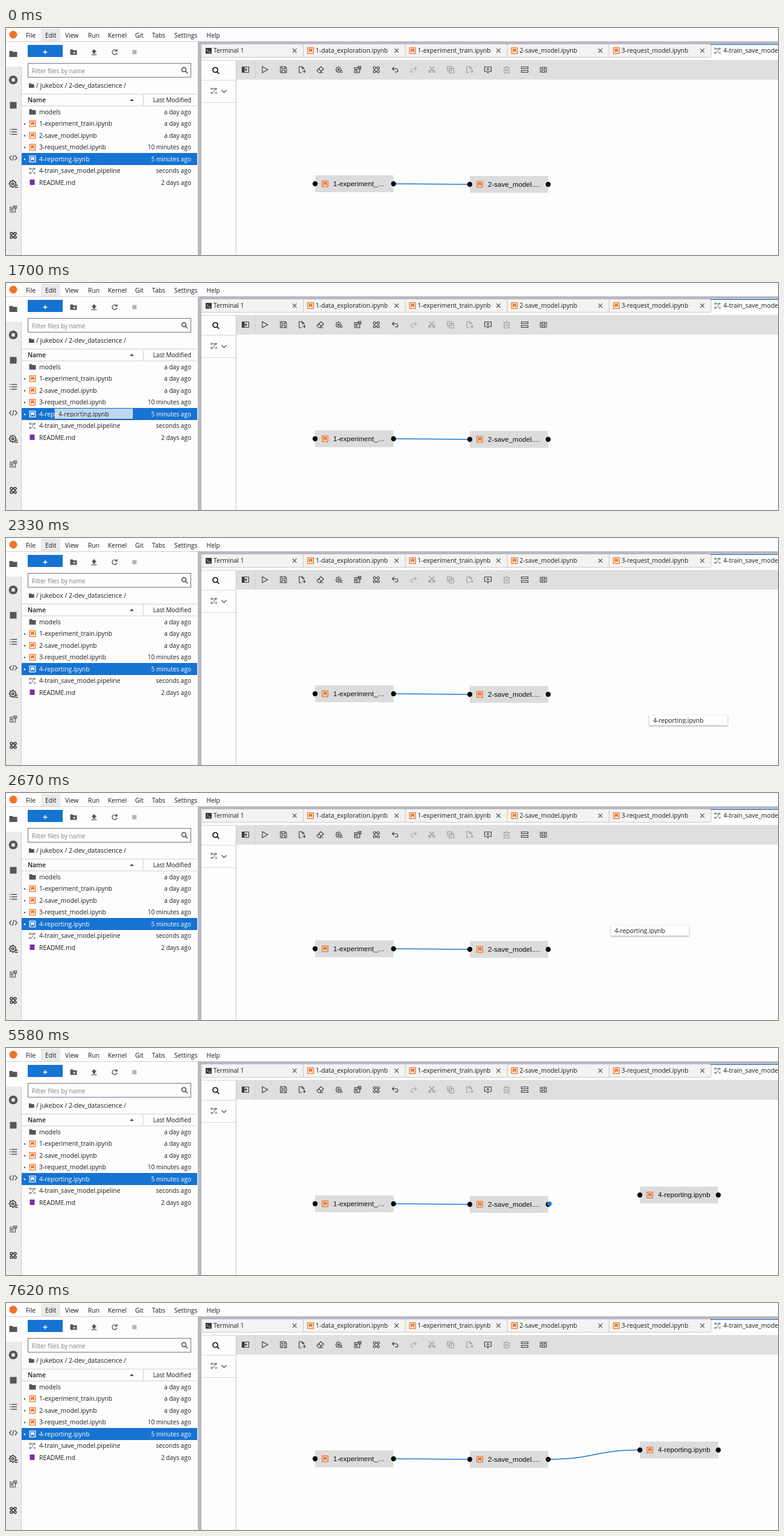
An HTML page that plays this animation: 1280 px wide and 376 px high, repeating every 8970 ms.

```html
<!DOCTYPE html>
<html lang="en">
<head>
<meta charset="utf-8">
<title>Pipeline editor</title>
<style>
html, body { margin: 0; width: 100%; height: 100%; overflow: hidden; background: #fdfdfd; }
svg { display: block; }
text { font: 10.35px "Open Sans", "Noto Sans", sans-serif; fill: #1c1c1c; white-space: pre; }
.node, .tip text { font: 11.55px "Liberation Sans", Arial, sans-serif; fill: #0c0c0c; }
.tip text { font-size: 11.4px; }
.card { opacity: .72; }
.card rect { filter: drop-shadow(0 1px 1.2px rgba(0, 0, 50, .6)); }
</style>
</head>
<body>
<svg id="stage" width="1280" height="376" viewBox="0 0 1280 376"></svg>
<script>
const LOOP = 8970, BLUE = '#1673d1', LINK = '#1f7bcd', ORANGE = '#ee7428', GREY = '#565656', PALE = '#a9a9a9';

const rect = (x, y, w, h, fill, more = '') => `<rect x="${x}" y="${y}" width="${w}" height="${h}" fill="${fill}" ${more}/>`;
const dot = (x, y, r, fill = '#0a0a0a', more = '') => `<circle cx="${x}" cy="${y}" r="${r}" fill="${fill}" ${more}/>`;
const text = (x, y, s, more = '') => `<text x="${x}" y="${y}" ${more}>${s}</text>`;
const icon = (x, y, d, color = GREY, width = 1.2, fill = 'none') =>
  `<path transform="translate(${x} ${y})" d="${d}" stroke="${color}" stroke-width="${width}" fill="${fill}"/>`;
const solid = (x, y, d, color = GREY) => icon(x, y, d, 'none', 0, color);
const ring = (x, y, r) => `M${x - r} ${y}a${r} ${r} 0 1 0 ${2 * r} 0a${r} ${r} 0 1 0 ${-2 * r} 0`;
const box = (x, y, w, h) => `M${x} ${y}h${w}v${h}h${-w}z`;
const curve = (x1, y1, x2, y2) => {
  const m = (x1 + x2) / 2;
  return `M${x1} ${y1}C${m} ${y1} ${m} ${y2} ${x2} ${y2}`;
};

const shape = {
  folder: 'M-5.5 -4.5h4l1.5 1.5h5.5v7.5h-11z',
  search: ring(-1, -1, 3.5) + 'M1.5 1.5L5.2 5.2',
  close: 'M-3.3 -3.3L3.3 3.3M3.3 -3.3L-3.3 3.3',
  flow: ring(-4, -3.3, 1.3) + ring(-4, 3.6, 1.3) + 'M-2.7 -3.3H4.5M-2.7 3.6C1 3.6 0 -3.3 3 -3.3M2.5 -5L4.5 -3.3L2.5 -1.6M1.8 2L5 5.2M5 2L1.8 5.2',
  rings: [[-3, -3], [3, -3], [-3, 3], [3, 3]].map(p => ring(...p, 2)).join('') + 'M-1 -3h2M-1 3h2M-3 -1v2M3 -1v2',
  gear: ring(-.5, 0, 4) + ring(-.5, 0, 1.4) + 'M-6 0h1.5M-.5 -5.5v1.5M-.5 4v1.5M-4.5 -4l1.2 1.2M-4.5 4l1.2 -1.2M2 2h4M2 4.5h4',
  puzzle: box(-5, -3.5, 8.5, 8.5) + 'M-3 -1h2v2h-2zM-3 3h4M1 -5.5h4.5v4.5H1z',
  refresh: 'M3.2 -2.4A4 4 0 1 0 4 .8M4 -5v3.2H.8',
  sheet: 'M4 0V-2L1 -5H-4V5H0M1 -5v3h3M1.5 3H6M4 1l2 2l-2 2',
  undo: 'M-1.5 -4.5L-4.5 -1.5L-1.5 1.5M-4.5 -1.5H2a2.7 2.7 0 0 1 0 5.4H0',
  redo: 'M1.5 -4.5L4.5 -1.5L1.5 1.5M4.5 -1.5H-2a2.7 2.7 0 0 0 0 5.4H0',
};

const notebook = (x, y, color = ORANGE) =>
  icon(x, y, box(-4.8, -4.8, 9.6, 9.6), color, 1.3) + solid(x, y, 'M-2.8 -3h5.6v6l-2.8 -2.2l-2.8 2.2z', color);

function menu() {
  const items = [['File', 33], ['Edit', 65], ['View', 98], ['Run', 136], ['Kernel', 169], ['Git', 214], ['Tabs', 242], ['Settings', 279], ['Help', 332.5]];
  return rect(58, 1, 32, 21, '#e9e9e9') + dot(12, 11, 6.5, ORANGE) +
    items.map(([s, x]) => text(x, 15.7, s)).join('');
}

function sidebar() {
  return rect(0, 22, 26, 354, '#ebebeb') + rect(0, 22, 318, 1, '#d2d2d2') + rect(25, 64, 1, 312, '#cdcdcd') +
    rect(0, 23, 26, 41, '#fdfdfd') +
    solid(12, 43, 'M-6.5 -5h5l1.6 1.6h6.4v8.4h-13z') +
    dot(12, 86, 7.3, GREY) + rect(9.3, 83.3, 5.4, 5.4, '#ebebeb') +
    rect(6.5, 122.5, 11, 11, GREY) +
    icon(12, 172, 'M-6 -4h1.6M-6 0h1.6M-6 4h1.6M-3 -4H6.3M-3 0H6.3M-3 4H6.3', GREY, 1.6) +
    icon(12, 215, 'M-2.8 -4L-6.3 0L-2.8 4M2.8 -4L6.3 0L2.8 4M1 -4.5L-1 4.5', GREY, 1.4) +
    `<g transform="translate(12 258) scale(1.25)">${icon(0, 0, shape.gear, '#333')}</g>` +
    icon(12, 300, shape.puzzle) + icon(12, 343.5, shape.rings, '#333', 1.5);
}

function browser() {
  const rows = [
    ['models', 'a day ago'], ['1-experiment_train.ipynb', 'a day ago'], ['2-save_model.ipynb', 'a day ago'],
    ['3-request_model.ipynb', '10 minutes ago'], ['4-reporting.ipynb', '5 minutes ago'],
    ['4-train_save_model.pipeline', 'seconds ago'], ['README.md', '2 days ago'],
  ];
  const end = 'text-anchor="end" style="font-size:10.05px"';
  let s = rect(36, 28, 58, 20, BLUE) + icon(65, 40, 'M-3.5 0h7M0 -3.5v7', '#fff', 1.4) +
    solid(112, 40, shape.folder) + icon(113, 41, 'M-2 0h4M0 -2v4', '#fff', 1) +
    solid(146, 40, 'M0 -5L4.5 -.5H2V2.5H-2V-.5H-4.5zM-4.5 3.7h9v1.4h-9z') +
    icon(180, 40, shape.refresh, GREY, 1.4) + rect(209.5, 36.5, 7, 7, '#b4b4b4') +
    rect(36.5, 58.5, 270, 23, '#fdfdfd', 'stroke="#70748c"') +
    text(43, 74.7, 'Filter files by name', 'style="fill:#808080;font-size:10.1px"') +
    icon(296, 70, shape.search, '#444', 1.4) +
    `<g transform="translate(42.3 95.3) scale(.8)">${solid(0, 0, shape.folder)}</g>` +
    text(50, 99, '/ jukebox / 2-dev_datascience /', 'style="font-size:10.45px"') +
    rect(26, 109, 291, 1, '#d0d0d0') + rect(26, 128.5, 291, 1, '#d0d0d0') + rect(227, 110, 1, 18, '#d0d0d0') +
    text(36, 122.5, 'Name', 'style="font-weight:600"') + solid(208.5, 119, 'M0 -2L3.5 2h-7z') +
    text(307, 122.5, 'Last Modified', end) +
    rect(26, 226, 291, 19.5, '#eee', 'id="hover" visibility="hidden"') +
    rect(26, 207, 291, 20, BLUE);
  rows.forEach(([name, age], i) => {
    const y = 139 + 19.5 * i, on = i == 4, fill = on ? 'fill:#fff;' : '';
    if (i > 0 && i < 5) s += dot(31, y + .5, 1.3, on ? '#fff' : GREY) + notebook(44, y, on ? '#fff' : ORANGE);
    s += text(55, y + 3.8, name, `style="${fill}"`) +
      text(307, y + 3.8, age, `text-anchor="end" style="${fill}font-size:10.05px"`);
  });
  return s + solid(44, 139, shape.folder) + icon(44, 236.5, shape.flow, GREY, .9) + rect(39.5, 251, 8, 9, '#7b2fa5');
}

function tabs() {
  const names = ['Terminal 1', '1-data_exploration.ipynb', '1-experiment_train.ipynb', '2-save_model.ipynb', '3-request_model.ipynb', '4-train_save_model.pipeline'];
  let s = rect(318, 22, 962, 5, '#b9b9c2') + rect(318, 22, 6, 354, '#b9b9c2') + rect(324, 48, 956, 1, '#c9c9c9');
  names.forEach((name, i) => {
    const x = 323.5 + 169 * i, last = i == 5;
    s += rect(x, 27, 169, 21, last ? '#fdfdfd' : '#f3f3f2') + rect(x, 27, 1, 21, '#c4c4c4');
    if (!last) s += icon(x + 155, 37.5, shape.close, '#444', 1.1);
    if (i == 0) s += rect(331, 33, 10, 9.5, '#333') + icon(336, 37.5, 'M-3 -2l2 2l-2 2M0 2.3h3', '#fff', 1);
    else if (!last) s += notebook(x + 12.5, 37.5);
    s += text(i ? x + 21 : 344, 41.4, name);
  });
  return s + rect(1168, 27, 112, 1, BLUE) + rect(1168, 48, 112, 1, '#fdfdfd') + icon(1180, 37.5, shape.flow, GREY, .9);
}

function toolbar() {
  const pen = (x, d, c = '#3c3c3c') => icon(x, 69, d, c, 1.15);
  const align = 'M-5.5 -4.5h11v3h-11zM-5.5 1.5h11v3h-11z';
  return rect(382, 53, 898, 32.5, '#dfdfdf') + rect(324, 53, 57, 1, '#d8d8d8') +
    rect(324, 86, 57, 1, '#d8d8d8') + rect(324, 123, 57, 1, '#d8d8d8') + rect(381, 53, 1, 323, '#c8c8c8') +
    icon(348, 70.5, ring(-1, -1, 4) + 'M2 2L5.5 5.5', '#111', 1.7) + icon(345, 104, shape.flow, GREY, 1) +
    icon(361.5, 105, 'M-4 -2L0 2L4 -2', GREY, 1.3) + rect(412.5, 54, 1, 31, '#cfcfcf') +
    pen(397, box(-5.5, -4.5, 11, 9) + 'M-2 -4.5v9M3.5 0H0M1.5 -2L-.5 0l2 2') + solid(397, 69, box(-5.5, -4.5, 3.5, 9), '#3c3c3c') +
    pen(429, 'M-4 -5L5 0L-4 5z') +
    pen(460, 'M-5 -5h8l2 2v8h-10zM-2.5 -5v3.5h5v-3.5M-2.5 5v-4h5v4') +
    pen(490, shape.sheet) +
    pen(521, 'M-5.5 1.5L1 -5L5.5 -1L-.5 5H-2.5zM-2.5 -1.5L2 3M-.5 5H5') +
    pen(552, shape.gear) + pen(583, shape.puzzle) + pen(614, shape.rings) +
    pen(645, shape.undo) + pen(676, shape.redo, PALE) +
    pen(706, ring(-3.5, 3, 1.7) + ring(3.5, 3, 1.7) + 'M-2.5 1.5L4 -5M2.5 1.5L-4 -5', '#8f8f8f') +
    pen(737, box(-5, -5, 7, 7) + box(-2, -2, 7.5, 7.5), '#999') +
    pen(768, shape.sheet, '#999') +
    pen(799, 'M-5.5 -4.5h11v7.5h-4l-1.5 2.5l-1.5 -2.5h-4zM0 -3v4.5M-2.2 -.8h4.4') +
    pen(830, 'M-5 -3.5h10M-1.5 -5.3h3M-4 -3.5v9h8v-9M-1.3 -1v4M1.3 -1v4', '#999') +
    pen(860, align) + pen(891, 'M-5 -5v10M5 -5v10M-2.5 -4h5v3h-5zM-2.5 1.5h5v3h-5z');
}

const node = (x, y, label) =>
  rect(x, y, 130, 28, '#dcdcdc') + notebook(x + 16.5, y + 14) + text(x + 30, y + 17.8, label, 'class="node"') +
  dot(x, y + 14, 4.2) + dot(x + 130, y + 14, 4.2);

const tip = (id, x, y, w, label) =>
  `<g id="${id}" class="tip">${rect(x, y, w, 24, '#d0d0d0', 'stroke="#bcbcbc" stroke-width=".8"')}${text(x + 6, y + 15, label)}</g>`;

stage.innerHTML = rect(0, 0, 1280, 376, '#fdfdfd') + menu() + sidebar() + browser() + tabs() + toolbar() +
  `<path d="${curve(642, 258, 769, 259)}" fill="none" stroke="${LINK}" stroke-width="1.6"/>
  <path id="link" fill="none" stroke="${LINK}" stroke-width="1.6"/>` +
  node(512.5, 244, '1-experiment_…') + node(769, 245, '2-save_model.…') +
  `<g id="report">${node(1051, 229.5, '4-reporting.ipynb')}</g>` +
  dot(0, 0, 3.8, LINK, 'id="tail"') +
  tip('outTip', 856, 272.5, 85, 'Output Port') + tip('inTip', 1009, 257, 82, 'Input Port') +
  `<g id="ghost"><g class="card">${rect(0, 0, 130, 17, '#fff')}</g>
  <svg width="130" height="14.3">${text(6.5, 12.5, '4-reporting.ipynb')}</svg></g>`;

// Smooth track through [time, x, y] keys, clamped at both ends.
function follow(keys, t) {
  const n = keys.length - 1;
  if (t <= keys[0][0]) return keys[0].slice(1);
  if (t >= keys[n][0]) return keys[n].slice(1);
  const i = keys.findIndex(k => k[0] > t) - 1;
  const a = keys[Math.max(i - 1, 0)], b = keys[i], c = keys[i + 1], d = keys[Math.min(i + 2, n)];
  const u = (t - b[0]) / (c[0] - b[0]);
  return [1, 2].map(k => b[k] + u / 2 * (c[k] - a[k] +
    u * (2 * a[k] - 5 * b[k] + 4 * c[k] - d[k] + u * (3 * (b[k] - c[k]) + d[k] - a[k]))));
}

const ghostKeys = [[1700, 79.5, 208], [1800, 270, 224], [1910, 590, 270], [2030, 891.5, 314.5], [2130, 1015, 326],
  [2260, 1066, 312], [2400, 1056, 272], [2570, 1018, 230], [2670, 1002.5, 219.5]];
const pullKeys = [[5580, 901, 258], [5700, 914, 270], [5900, 972, 265], [6100, 1030, 251], [6270, 1052, 245],
  [6620, 1052, 245], [6740, 1058, 241], [6850, 1053, 243]];

const show = (el, on) => el.setAttribute('visibility', on ? 'visible' : 'hidden');
const within = (t, a, b) => t >= a && t < b;
const fade = (t, a, b) => within(t, a, b) ? Math.min(1, .5 + Math.floor((t - a) / 30) * .25) : 0;

function draw(now) {
  const t = now % LOOP;
  show(hover, within(t, 330, 580));
  hover.setAttribute('y', t < 450 ? 246 : 226.5);

  show(ghost, within(t, 1700, 3050));
  ghost.setAttribute('transform', `translate(${follow(ghostKeys, t)})`);
  show(report, t >= 3250);

  const nudge = within(t, 4850, 4980), pulling = nudge || within(t, 5580, 7080);
  const [x, y] = nudge ? [902, 268] : t < 7080 ? follow(pullKeys, t) : [1051, 243.5];
  show(link, pulling || t >= 7080);
  show(tail, pulling);
  link.setAttribute('d', curve(899, 259, x, y));
  tail.setAttribute('cx', x);
  tail.setAttribute('cy', y);

  outTip.setAttribute('opacity', fade(t, 4070, 4320) + fade(t, 5250, 5380));
  inTip.setAttribute('opacity', fade(t, 7280, 7620));
  requestAnimationFrame(draw);
}
const [hover, ghost, report, link, tail, outTip, inTip] =
  ['hover', 'ghost', 'report', 'link', 'tail', 'outTip', 'inTip'].map(id => document.getElementById(id));
draw(performance.now());
</script>
</body>
</html>
```
